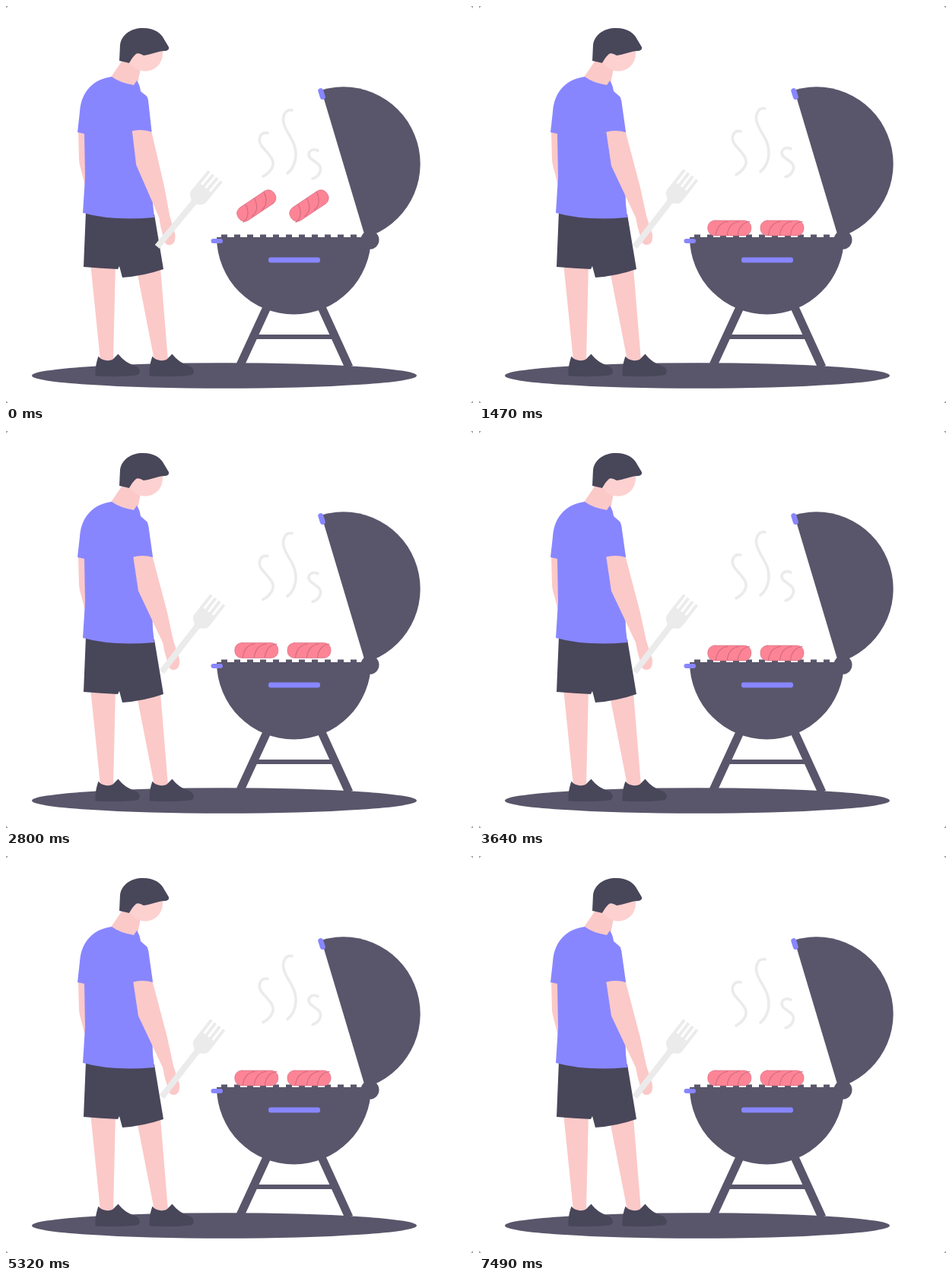
An HTML page with a canvas for the animation above (7.56 s loop, 614x522 px).

```html
<!DOCTYPE html>
<html lang="en">
<head>
<meta charset="utf-8">
<title>Barbecue</title>
<style>
html, body { margin: 0; width: 100%; height: 100%; overflow: hidden; background: #fff; }
canvas { display: block; width: 614px; height: 522px; }
</style>
</head>
<body>
<canvas id="stage" width="614" height="522"></canvas>
<script>
const ctx = document.getElementById('stage').getContext('2d');
const LOOP = 7560, STEP = 70, CYCLE = 2100;
const DARK = '#59566b', CLOTH = '#484659', SKIN = '#fbc9c8', FACE = '#fdd1d0';
const BLUE = '#8886ff', PALE = '#ebebeb', MEAT = '#fd8495', SEAR = '#cf6a80';

const clamp = x => Math.max(0, Math.min(1, x));
const smooth = x => (1 - Math.cos(Math.PI * clamp(x))) / 2;

function track(keys, t) {
  let i = 1;
  while (i < keys.length - 1 && t > keys[i][0]) i++;
  const [t0, a] = keys[i - 1], [t1, b] = keys[i];
  return a + (b - a) * smooth((t - t0) / (t1 - t0));
}

// arm angle in degrees over one toss
const ARM = [[0, -0.1], [140, 0.4], [620, -1.8], [700, -1.8], [850, 7.1],
  [1120, -1.8], [1500, -1.8], [1960, 0.5], [2030, 0.4], [2100, -0.1]];
const STEAM = [[0, 0], [840, 1], [2100, -5.5], [2800, -2.5], [3300, -5], [4340, -1],
  [5250, -5.5], [6230, -1], [6860, -5], [7490, -1], [7560, 0]];

function tossHeight(p) {
  const top = 262.5, rest = 292;
  if (p < 371) return top;
  if (p < 671) return top + (rest - top) * ((p - 371) / 300) ** 2;
  if (p < 1069) return rest - 13 * (1 - ((p - 870) / 199) ** 2);
  if (p < 1735) return rest;
  const k = 1 - clamp((p - 1735) / 250);
  return top + (rest - top) * k * k;
}

function tossAngle(p) {
  const q = p > 1100 ? p - CYCLE : p;
  return 2 * Math.PI * smooth((q + 365) / 830);
}

function fill(d, color) {
  ctx.fillStyle = color;
  ctx.fill(new Path2D(d));
}

function line(d, color, width, cap = 'butt') {
  ctx.strokeStyle = color;
  ctx.lineWidth = width;
  ctx.lineCap = cap;
  ctx.stroke(new Path2D(d));
}

function disc(x, y, rx, ry, color) {
  ctx.beginPath();
  ctx.ellipse(x, y, rx, ry, 0, 0, 2 * Math.PI);
  ctx.fillStyle = color;
  ctx.fill();
}

function pill(x, y, w, h, r, color) {
  ctx.beginPath();
  ctx.roundRect(x, y, w, h, r);
  ctx.fillStyle = color;
  ctx.fill();
}

function group(x, y, angle, draw) {
  ctx.save();
  ctx.translate(x, y);
  ctx.rotate(angle);
  draw();
  ctx.restore();
}

function grill() {
  line('M344 394L308 472M414 394L451 475', DARK, 11);
  line('M327 435H430', DARK, 6);
  ctx.fillStyle = DARK;
  ctx.beginPath();
  ctx.arc(378.5, 304, 101.5, 0, Math.PI);
  ctx.fill();
  for (let i = 0; i < 11; i++) ctx.fillRect(283 + i * 17, 300.5, 8, 5);
  const tilt = Math.atan2(97, 29);
  ctx.beginPath();
  ctx.arc(443.5, 207.5, 101.2, tilt - Math.PI, tilt);
  ctx.fill();
  disc(478.5, 307.5, 12, 12.3, DARK);
  pill(269.5, 306, 15.5, 6, 3, BLUE);
  pill(345, 330.5, 68, 7, 3, BLUE);
  line('M413.8 111.5L416.3 119.5', BLUE, 7, 'round');
}

function steam(dy) {
  ctx.save();
  ctx.translate(0, dy);
  line('M344 167C335 165 330 175 336 184C345 195 356 203 349 214C346 219 342 222 338 224', PALE, 3.6, 'round');
  line('M376 137C367 135 362 146 366 157C371 171 382 179 381 198C380 208 375 216 370 220', PALE, 3.6, 'round');
  line('M410 190C401 186 395 193 400 200C407 206 416 209 413 218C411 223 407 226 403 227', PALE, 3.6, 'round');
  ctx.restore();
}

function sausage(x, y, angle) {
  group(x, y, angle, () => {
    pill(-28.5, -10, 57, 20, 9, MEAT);
    ctx.strokeStyle = SEAR;
    ctx.lineWidth = 0.6;
    ctx.stroke();
    for (const s of [-11, 4, 18]) {
      line(`M${s - 7} 9.5C${s - 6} 0 ${s - 1} -8 ${s + 9} -8.5`, SEAR, 1.1);
    }
  });
}

function legs() {
  fill('M111 338L144 338L141 466L124 466Z', SKIN);
  fill('M172 348L203 344L213 466L195 466Z', SKIN);
  const shoe = 'M0 27C0 20 0 12 4 1C8 7 18 8 23 5L30 -2C36 6 44 11 53 14C60 17 60 25 54 26C38 28 18 28 0 27Z';
  for (const x of [117.5, 188.5]) group(x, 459.5, 0, () => fill(shoe, CLOTH));
}

function body() {
  fill('M95 164H104V238C103 228 97 213 96 203Z', SKIN);
  fill('M105 270L195 274L207 346Q181 355 153 357L149 342L147 346Q125 345 102 343Z', CLOTH);
  fill('M154 70L137 95L172 107L177 82Z', SKIN);
  fill('M139 93Q150 101 168 104L172 98Q176 104 177 112L186 120L190 170L193 260L195 278' +
    'Q140 283 101 272L104 225L103 168L94 166L97 139C99 111 116 96 139 93Z', BLUE);
}

function head(dx) {
  group(dx, 0, 0, () => {
    disc(183, 62.5, 23, 23.3, FACE);
    fill('M149 72L150 51C152 37 165 29 180 29C196 29 204 36 208 44L214 54Q215 58 210 59' +
      'C200 59 190 64 181 65Q174 61 171 63Q167 66 162 75Z', CLOTH);
  });
}

function fork() {
  group(198.5, 316.5, Math.atan2(-92.5, 76.5), () => {
    ctx.fillStyle = PALE;
    ctx.fillRect(0, -4, 84, 8);
    fill('M74 -4C79 -4 77 -12.5 87 -12.5H100V12.5H87C77 12.5 79 4 74 4Z', PALE);
    for (let i = 0; i < 4; i++) ctx.fillRect(98, -12.5 + i * 7, 22, 4);
  });
}

function arm(deg) {
  ctx.save();
  ctx.translate(210, 115);
  ctx.rotate(deg * Math.PI / 180);
  ctx.translate(-210, -115);
  fill('M165 158L190 160L208 238L215 276L222 300Q223 313 216 314Q210 315 208 310L203 290L201 278L171 209Z', SKIN);
  fill('M166 125L176 114Q185 115 187 124L191.5 165.5Q178 161 164.5 164.5Z', BLUE);
  fork();
  ctx.restore();
}

function corners() {
  fill('M0 0H3L0 3ZM614 0H611L614 3ZM0 522H3L0 519ZM614 522H611L614 519Z', '#a5a5a5');
}

function draw(t) {
  const p = t % CYCLE, swing = track(ARM, p);
  ctx.fillStyle = '#fff';
  ctx.fillRect(0, 0, 614, 522);
  corners();
  disc(287, 486, 253, 16.7, DARK);
  grill();
  steam(track(STEAM, t));
  for (const x of [329.3, 398.5]) sausage(x, tossHeight(p), tossAngle(p));
  legs();
  body();
  head(-Math.max(0, swing) / 7);
  arm(swing);
}

const start = performance.now();
function tick() {
  const t = (performance.now() - start) % LOOP;
  draw(Math.floor(t / STEP) * STEP);
  requestAnimationFrame(tick);
}
tick();
</script>
</body>
</html>
```
